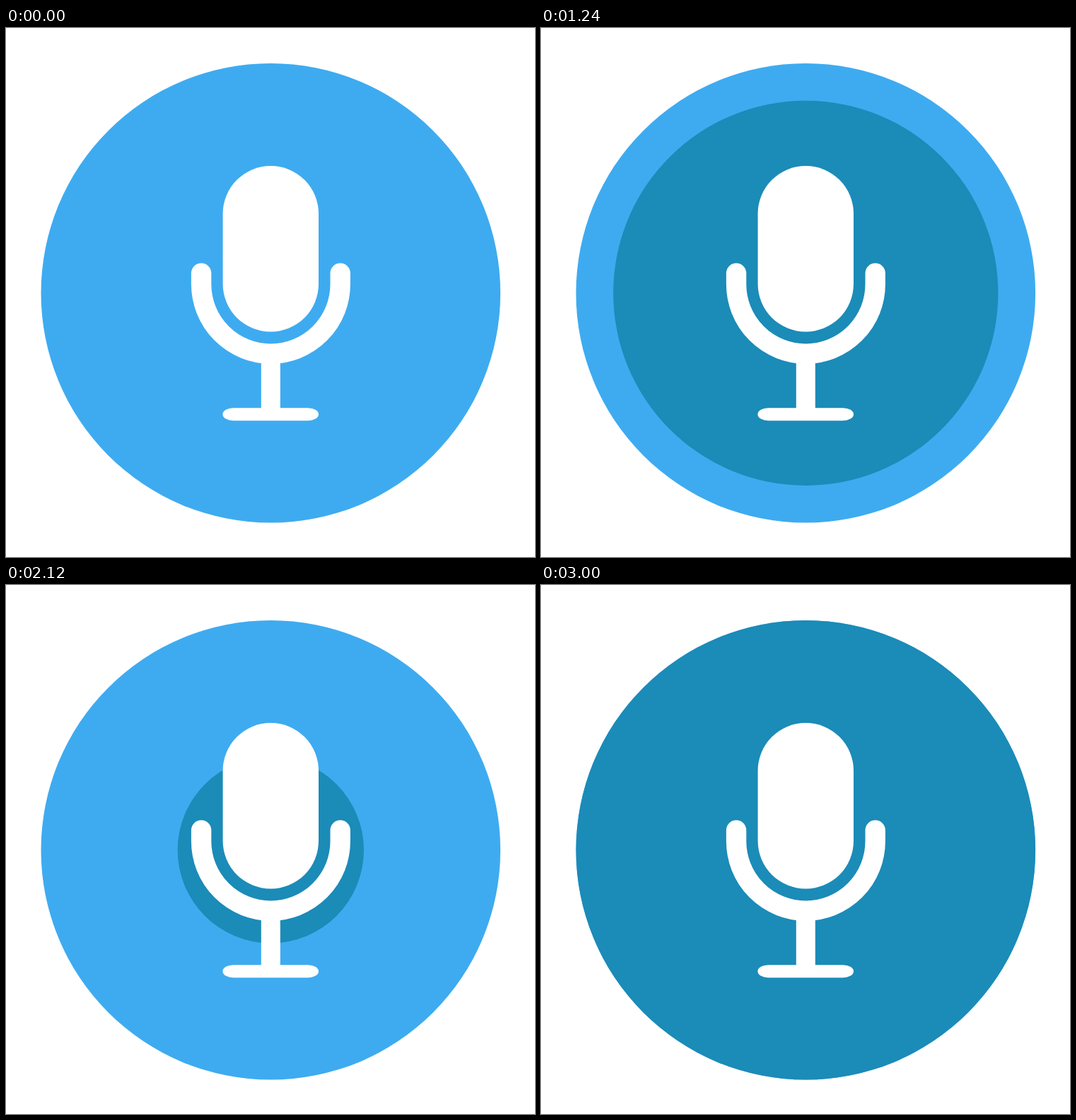
These frames come from a looping animation (748x748 px, 3040 ms). An HTML page:

```html
<!DOCTYPE html>
<html lang="en">
<head>
<meta charset="utf-8">
<title>Microphone pulse</title>
<style>
  html, body { margin: 0; width: 100%; height: 100%; overflow: hidden; background: #fff; }
  svg { display: block; width: 100vw; height: 100vh; }
</style>
</head>
<body>
<svg viewBox="0 0 748 748">
  <circle cx="374.3" cy="374.8" r="324.8" fill="#3eabf0"/>
  <circle id="pulse" cx="374.3" cy="374.8" r="0" fill="#1b8bb8"/>
  <g fill="#fff">
    <rect x="306.6" y="195" width="135.4" height="234.5" rx="67.7"/>
    <path d="M276.1 346.8V362.3A98.3 98.3 0 0 0 472.7 362.3V346.8"
          fill="none" stroke="#fff" stroke-width="28.4" stroke-linecap="round"/>
    <rect x="360.8" y="465" width="27" height="80"/>
    <rect x="306.4" y="537.2" width="135.6" height="18" rx="15" ry="9"/>
  </g>
</svg>
<script>
  const PERIOD = 1520, STEP = 40, FULL_RADIUS = 324.8;
  const pulse = document.getElementById('pulse');
  const start = performance.now();

  // The disc grows linearly in 40 ms steps, fills the circle, then restarts.
  function draw(time) {
    const step = Math.floor((time % PERIOD) / STEP);
    const lastStep = PERIOD / STEP - 1;
    pulse.setAttribute('r', FULL_RADIUS * step / lastStep);
  }

  function tick() {
    draw(performance.now() - start);
    requestAnimationFrame(tick);
  }
  tick();
</script>
</body>
</html>
```
